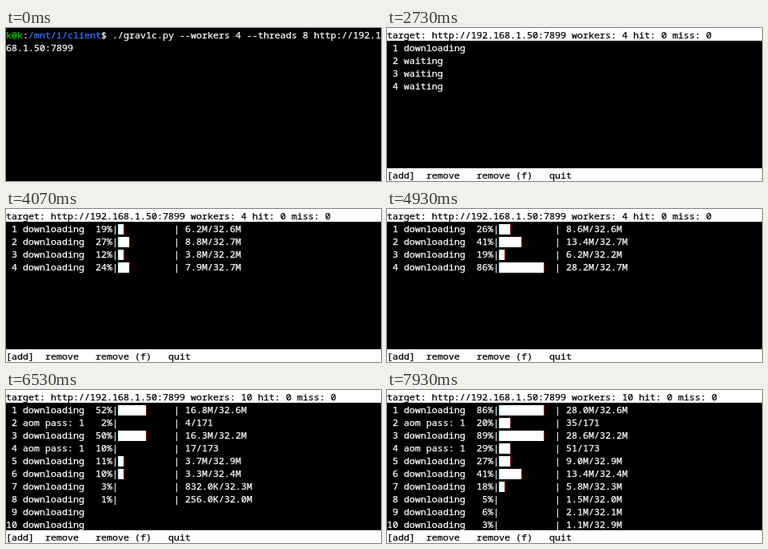
These frames come from a looping animation (469x192 px, 8000 ms). An HTML page:

```html
<!DOCTYPE html>
<html lang="en">
<head>
<meta charset="utf-8">
<title>Terminal: encoding workers</title>
<style>
html, body { margin: 0; width: 100%; height: 100%; overflow: hidden; background: #000; }
svg { display: block; width: 469px; height: 192px; }
text { font: 11.667px "Noto Sans Mono", "DejaVu Sans Mono", monospace; white-space: pre; stroke-width: 0.25px; }
</style>
</head>
<body>
<svg id="screen" viewBox="0 0 469 192" xmlns="http://www.w3.org/2000/svg"></svg>
<script>
const LOOP = 8000, CELL_W = 7, CELL_H = 16;
const WHITE = '#fff', GREEN = '#16c60c', BLUE = '#3b78ff';
const screen = document.getElementById('screen');

// data: time, megabytes, ...   enc: time, encoded pictures, ...
const workers = [
  { from: 2730, total: 32.6, data: [2800, 0, 4070, 6.2, 4930, 8.6, 5870, 12.2, 7130, 21, 7930, 28] },
  { from: 2870, total: 32.7, data: [2930, 0, 4070, 8.8, 4930, 13.4, 5130, 14.4, 5700, 32.7],
    count: 171, enc: [6330, 0, 7130, 17, 7930, 35] },
  { from: 2930, total: 32.2, data: [3000, 0, 4070, 3.8, 4930, 6.2, 5870, 11.2, 7130, 20.9, 7930, 28.6] },
  { from: 3000, total: 32.7, data: [3070, 0, 4070, 7.9, 4930, 28.2, 5130, 32.7],
    count: 173, enc: [5870, 0, 7130, 33, 7930, 51] },
  { from: 5600, total: 32.9, data: [5700, 0, 5870, 0.125, 7130, 6.9, 7930, 9] },
  { from: 5800, total: 32.4, data: [5900, 0, 7130, 6.3, 7930, 13.4] },
  { from: 5930, total: 32.3, data: [6100, 0, 7130, 2, 7930, 5.8] },
  { from: 6070, total: 32, data: [6300, 0, 7130, 0.8125, 7930, 1.5] },
  { from: 6200, total: 32.1, data: [6900, 0, 7130, 0.0625, 7930, 2.07] },
  { from: 6400, total: 32.9, data: [6800, 0, 7130, 0.25, 7930, 1.1] }
];

function rect(x, y, w, h, color = WHITE) {
  return `<rect x="${x}" y="${y}" width="${w}" height="${h}" fill="${color}"/>`;
}

function put(row, col, str, color = WHITE) {
  const xs = [...str].map((_, i) => (col + i) * CELL_W).join(' ');
  return `<text x="${xs}" y="${row * CELL_H + 13}" fill="${color}" stroke="${color}">${str}</text>`;
}

// solid cells with the coloured edges of subpixel smoothing
function block(row, col, cells) {
  const x = col * CELL_W, y = row * CELL_H + 3, w = cells * CELL_W;
  return rect(x, y, w, 13) + rect(x, y, 1, 13, '#aff') + rect(x + w, y, 1, 13, '#900');
}

function sample(keys, t) {
  if (t <= keys[0]) return keys[1];
  for (let i = 2; i < keys.length; i += 2) {
    if (t <= keys[i]) {
      const k = (t - keys[i - 2]) / (keys[i] - keys[i - 2]);
      return keys[i - 1] + (keys[i + 1] - keys[i - 1]) * k;
    }
  }
  return keys[keys.length - 1];
}

function size(mb) {
  return mb < 1 ? (mb * 1024).toFixed(1) + 'K' : mb.toFixed(1) + 'M';
}

function progress(row, part, label) {
  const percent = String(Math.round(part * 100)).padStart(3);
  const cells = Math.floor(part * 10);
  return put(row, 15, `${percent}%|`) +
    (cells ? block(row, 20, cells) : '') +
    put(row, 30, '| ' + label);
}

function workerRow(w, i, t) {
  const row = i + 1;
  const head = status => put(row, 0, String(row).padStart(2) + ' ' + status);
  if (t < w.from) return head('waiting');
  if (w.enc && t >= w.data[w.data.length - 2]) {
    const done = Math.floor(sample(w.enc, t));
    return head('aom pass: 1') + progress(row, done / w.count, `${done}/${w.count}`);
  }
  // downloads arrive in 64K chunks
  const mb = Math.round(sample(w.data, t) * 16) / 16;
  return head('downloading') +
    (mb ? progress(row, mb / w.total, `${size(mb)}/${size(w.total)}`) : '');
}

function shell(t) {
  let out = put(0, 0, 'k@k', GREEN) + put(0, 3, ':') + put(0, 4, '/mnt/i/client', BLUE) +
    put(0, 17, '$ ./grav1c.py --workers 4 --threads 8 http://192.1') +
    put(1, 0, '68.1.50:7899');
  if (t >= 2530) out += rect(0, 44, CELL_W, 4);
  else if ((t >= 800 && t < 1330) || (t >= 1870 && t < 2400)) out += rect(84, 28, CELL_W, 4);
  return out;
}

function dashboard(t) {
  const active = workers.filter((w, i) => i < 4 || t >= w.from);
  return rect(0, 0, 469, CELL_H) + rect(0, 176, 469, CELL_H) +
    put(0, 0, `target: http://192.168.1.50:7899 workers: ${active.length} hit: 0 miss: 0`, '#000') +
    active.map((w, i) => workerRow(w, i, t)).join('') +
    put(11, 0, '[add]  remove   remove (f)   quit', '#000');
}

let last = -1;
function update(now) {
  // the terminal refreshes 15 times a second
  const tick = Math.floor((now % LOOP + 5) * 0.015) % 120;
  if (tick !== last) {
    last = tick;
    const t = Math.round(tick / 0.15) * 10;
    screen.innerHTML = t < 2730 ? shell(t) : dashboard(t);
  }
}

const start = performance.now();
function loop() {
  update(performance.now() - start);
  requestAnimationFrame(loop);
}
loop();
</script>
</body>
</html>
```
